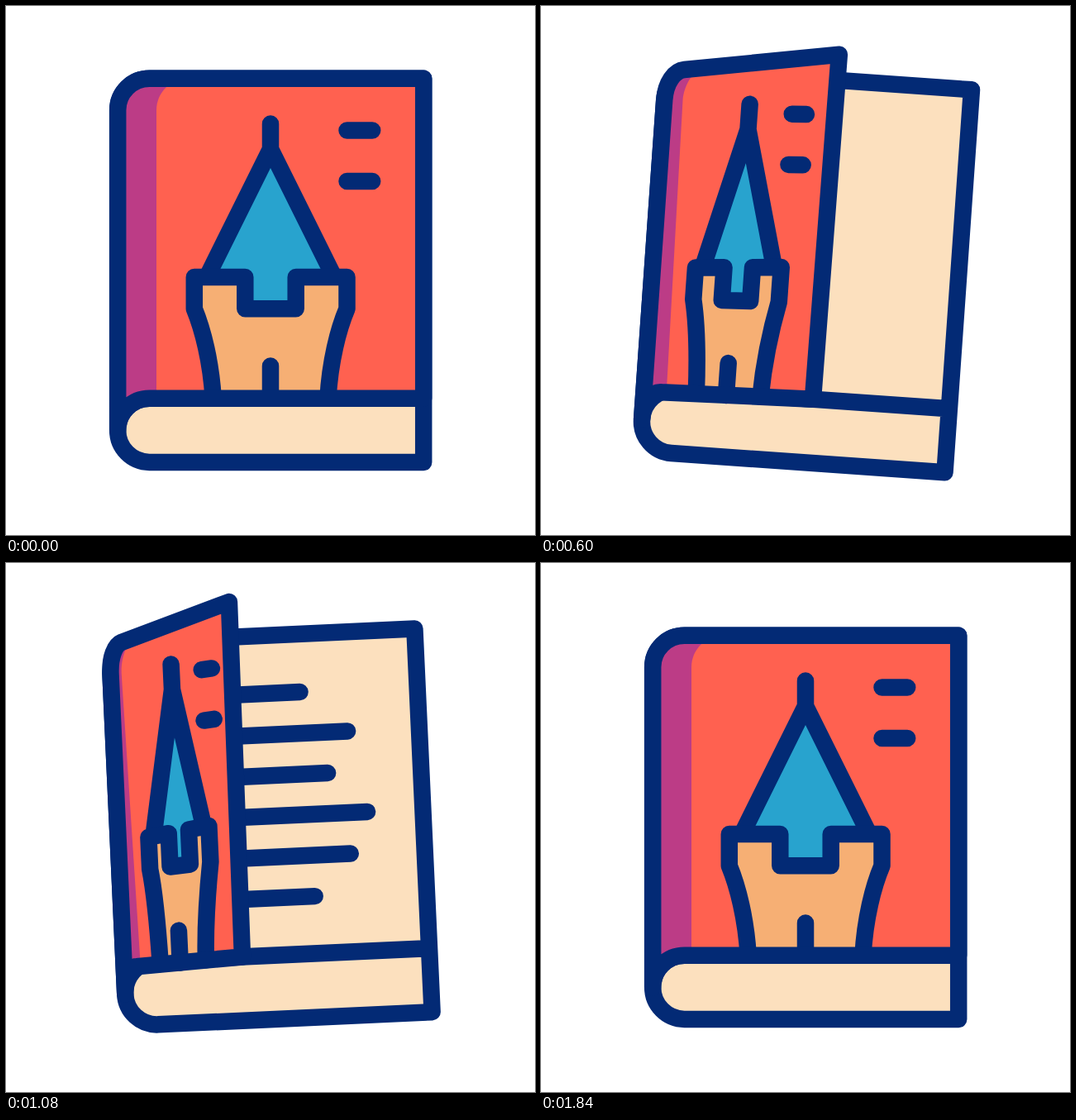
These frames come from a looping animation (640x640 px, 2400 ms). An HTML page:

```html
<!DOCTYPE html>
<html lang="en">
<head>
<meta charset="utf-8">
<title>Storybook</title>
<style>
  html, body { margin: 0; width: 100%; height: 100%; overflow: hidden; background: #fff; }
  svg { display: block; width: 100vw; height: 100vh; }
  .ink { fill: none; stroke: #032a75; stroke-width: 20.5; stroke-linecap: round; stroke-linejoin: round; }
</style>
</head>
<body>
<svg viewBox="0 0 640 640">
  <g id="book">
    <path fill="#fce0be" stroke="none" d="M505.2 87.8H173.5A38.3 38.3 0 0 0 135.2 126.1V513.4A38.4 38.4 0 0 0 173.5 551.9H505.2Z"/>
    <path id="text" class="ink"/>
    <path class="ink" d="M505.2 87.8H173.5A38.3 38.3 0 0 0 135.2 126.1V513.4A38.4 38.4 0 0 0 173.5 551.9H505.2ZM505.2 474.7H173.5A38.4 38.4 0 0 0 135.2 513.4"/>
    <path id="back" fill="#bc3c86"/>
    <path id="face" fill="#ff6150"/>
    <path id="roof" fill="#28a3ce"/>
    <path id="spire" class="ink"/>
    <path id="wall" fill="#f6af74" class="ink" style="fill:#f6af74"/>
    <path id="marks" class="ink"/>
    <path id="edge" class="ink"/>
  </g>
</svg>
<script>
const LOOP = 2400, STEP = 40;
const SPINE = 135.2, WIDTH = 370;
const $ = id => document.getElementById(id);
const draw = (id, d) => $(id).setAttribute("d", d);

// Cubic easing with flat ends; a and b are the handle lengths in time.
function ease(t, from, to, a, b) {
  const x = Math.min(1, Math.max(0, (t - from) / (to - from)));
  let lo = 0, hi = 1;
  for (let i = 0; i < 30; i++) {
    const v = (lo + hi) / 2, w = 1 - v;
    if (3 * w * w * v * a + 3 * w * v * v * b + v * v * v < x) lo = v; else hi = v;
  }
  return lo * lo * (3 - 2 * lo);
}

const tilt = t =>
  6 * ease(t, 280, 800, .33, .67) -
  9 * ease(t, 800, 1200, .33, .05) +
  3 * ease(t, 1200, 1600, .33, .67);

const opening = t =>
  .602 * (ease(t, 280, 980, .55, .1) - ease(t, 1280, 1840, .7, .3));

// Text rows: height, right end, start of growth
const rows = [
  [157.8, 363, 400], [207.8, 418.3, 465], [257.3, 392, 514],
  [306.3, 437.8, 510], [356, 415.2, 434], [405.5, 369.8, 467]
];

function drawText(t) {
  draw("text", rows.map(([y, end, start]) => {
    const len = (end - 205) * ease(t, start, start + 480, .33, .67);
    return `M205 ${y}h${len.toFixed(2)}`;
  }).join(""));
}

function drawCover(d) {
  const frac = x => (x - SPINE) / WIDTH;
  // Squeeze towards the spine, plus a drift that grows with the opening
  const p = (x, y, dy = 0, dx = 0) =>
    (SPINE + (x - SPINE) * (1 - d) + dx * d).toFixed(2) + " " + (y + dy * d).toFixed(2) + " ";

  const topRight = p(505.2, 87.8, -71);
  const lowRight = p(505.2, 474.7, 0, -6);
  const outline =
    "M" + topRight + "L" + p(173.5, 87.8) +
    "C" + p(152.3, 87.8, 5) + p(SPINE, 105) + p(SPINE, 126.1) +
    "L" + p(SPINE, 513.4) +
    "C" + p(SPINE, 492) + p(152.3, 474.7, 10) + p(173.5, 474.7, 10) +
    "L" + lowRight + "Z";
  draw("back", outline);
  draw("edge", outline);
  draw("face",
    "M" + topRight + "L" + p(220, 87.8, -10) +
    "C" + p(199, 87.8, -5, -4) + p(182, 105, 0, -9) + p(182, 126, 0, -9) +
    "L" + p(182, 474.7, 9, 2.5) + "L" + lowRight + "Z");

  const top = x => p(x, 328, 3.8 - 35 * frac(x));
  const mid = x => p(x, 366.3, .6 - 19 * frac(x));
  const foot = x => p(x, 474.7, 10 * (1 - frac(x)), -3);

  const apex = p(320, 173, -42);
  const legs = "M" + top(243) + "L" + apex + "L" + top(397);
  draw("roof", legs + "L" + mid(350.7) + "L" + mid(289.3) + "Z");
  draw("spire", legs + "M" + apex + "L" + p(320, 142.5, -42));

  draw("wall",
    "M" + foot(250.7) +
    "C" + p(248, 430, 3, -3) + p(238, 391, -1) + mid(227.8) +
    "L" + [top(227.8), top(289.3), mid(289.3), mid(350.7), top(350.7), top(412.5), mid(412.5)].join("L") +
    "C" + p(402, 391, -7) + p(392, 430, 0, -3) + foot(389.5));

  draw("marks",
    "M" + p(320, 435.5, 6.5, -9) + "L" + p(320, 474.7, 6, -9) +
    [150.6, 212].map(y => "M" + p(412.5, y, -41.5) + "L" + p(443.2, y, -43.5)).join(""));
}

function render(now) {
  const t = Math.floor((now % LOOP) / STEP) * STEP;
  $("book").setAttribute("transform", `rotate(${tilt(t).toFixed(3)} 320 320)`);
  drawText(t);
  drawCover(opening(t));
}

let begin = null;
function tick(now) {
  if (begin === null) begin = now;
  render(Math.max(0, now - begin));
  requestAnimationFrame(tick);
}
render(0);
requestAnimationFrame(tick);
</script>
</body>
</html>
```
